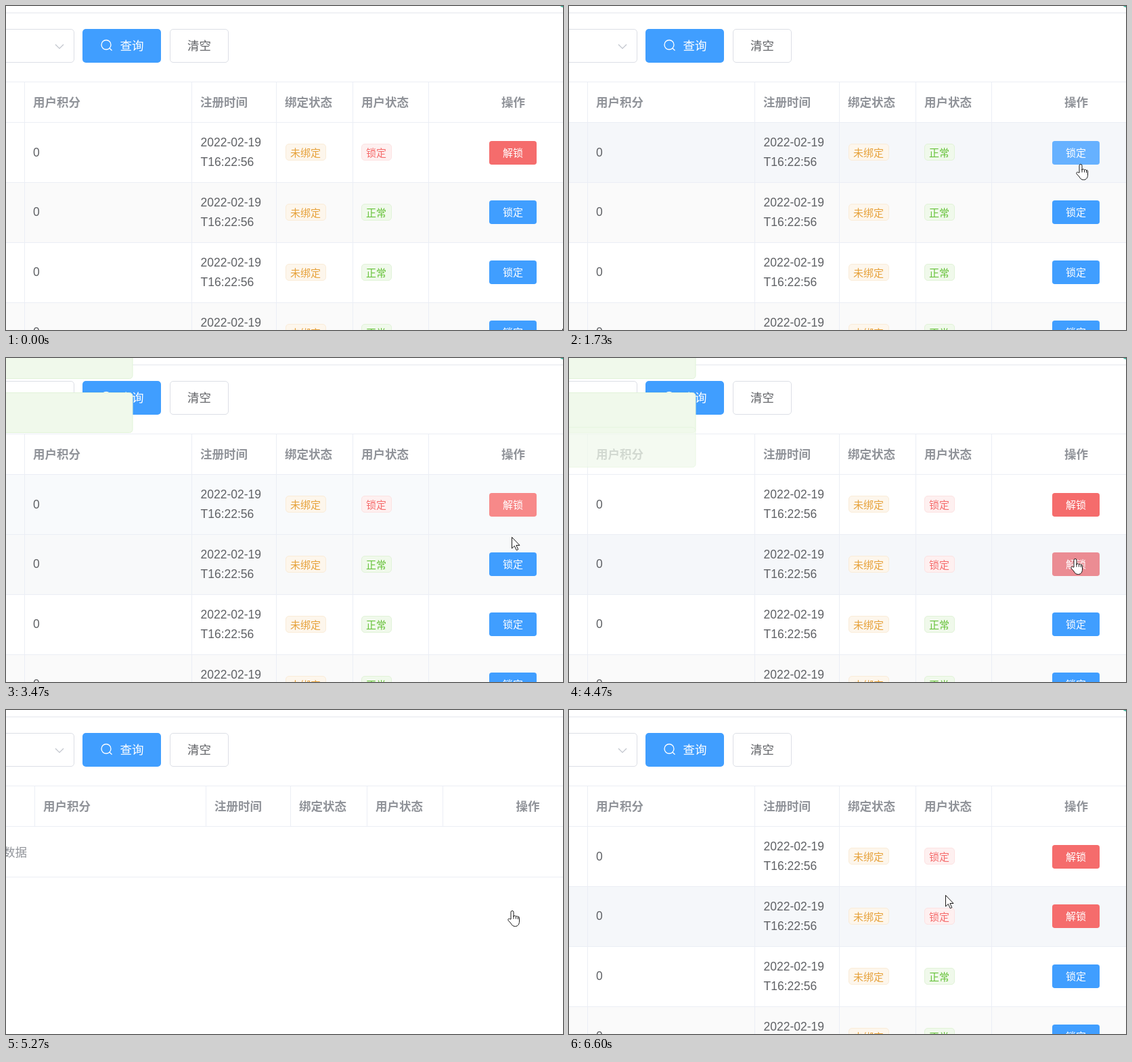
Recreate the animation shown at these times as an HTML page. Size 823 px wide and 480 px high, loop 7790 ms.

```html
<!DOCTYPE html>
<html lang="zh-CN">
<head>
<meta charset="utf-8">
<title>用户管理</title>
<style>
html, body { margin: 0; width: 100%; height: 100%; overflow: hidden; background: #fff; }
svg { display: block; }
text { font: 17.5px "Liberation Sans", "Noto Sans CJK SC", "Noto Sans CJK", sans-serif; fill: #606266; }
.head { font-weight: bold; fill: #909399; }
.small { font-size: 15px; }
</style>
</head>
<body>
<svg id="stage" width="823" height="480" viewBox="0 0 823 480"></svg>
<script>
const LOOP = 7790, STEP = 200 / 3;
const stage = document.getElementById('stage');

// Cursor way points: time, x, y
const PATH = [
  [133, 822, 478], [800, 762, 190], [933, 752, 214], [1133, 756, 234],
  [3333, 756, 234], [3400, 750, 262], [3466, 747, 265], [3667, 748, 302], [3800, 748, 297],
  [5267, 748, 297], [5667, 782, 278], [5867, 782, 278], [6267, 660, 264], [6600, 556, 274]
];
const PRESSES = [1390, 2590, 4060];
const MESSAGES = [1630, 2850, 4345];
const RELOAD = 5260, LOADED = 5390;

const BLUE = { base: '#409eff', hover: '#66b1ff', active: '#3a8ee6' };
const RED = { base: '#f56c6c', hover: '#f78989', active: '#dd6161' };
const TAGS = {
  未绑定: ['#fdf6ec', '#faecd8', '#e6a23c'],
  锁定: ['#fef0f0', '#fde2e2', '#f56c6c'],
  正常: ['#f0f9eb', '#e1f3d8', '#67c23a']
};

const between = (v, a, b) => v >= a && v < b;
const buttonTop = row => 200 + Math.floor(88.75 * row);
const isEmpty = t => between(t, RELOAD, LOADED);

// The CSS "ease" curve
function ease(x) {
  if (x <= 0) return 0;
  if (x >= 1) return 1;
  let lo = 0, hi = 1, s;
  for (let i = 0; i < 20; i++) {
    s = (lo + hi) / 2;
    const bx = .75 * s * (1 - s) * (1 - s) + .75 * s * s * (1 - s) + s ** 3;
    bx < x ? lo = s : hi = s;
  }
  return .3 * s * (1 - s) * (1 - s) + 3 * s * s * (1 - s) + s ** 3;
}

function cursorAt(t) {
  const i = PATH.findIndex(p => p[0] > t);
  if (i < 1) return (i ? PATH[PATH.length - 1] : PATH[0]).slice(1);
  const [t0, x0, y0] = PATH[i - 1], [t1, x1, y1] = PATH[i];
  let k = (t - t0) / (t1 - t0);
  k = k * k * (3 - 2 * k);
  return [x0 + (x1 - x0) * k, y0 + (y1 - y0) * k];
}

const hoveredRow = t => t < 200 || isEmpty(t) ? -1 : Math.floor((cursorAt(t)[1] - 173) / 89);

function hoveredButton(t) {
  const [x, y] = cursorAt(t);
  if (!between(x, 714, 784)) return -1;
  return [0, 1, 2, 3].findIndex(r => between(y, buttonTop(r), buttonTop(r) + 35));
}

const isLocked = (row, t) =>
  row === 0 ? !between(t, 1610, 2850) : row === 1 && t >= 4380;

function rowColor(row, t) {
  if (hoveredRow(t) === row) return '#f5f7fa';
  return row % 2 ? '#fafafa' : '#ffffff';
}

function buttonColor(row, t) {
  const focused = row === 0 ? between(t, 1390, 4060) : row === 1 && between(t, 4060, RELOAD);
  const set = isLocked(row, t) ? RED : BLUE;
  return focused || hoveredButton(t) === row ? set.hover : set.base;
}

// A colour transition: the mean of the colour over the last moments
function fade(color, row, t, duration) {
  const sum = [0, 0, 0], n = 12;
  for (let i = 0; i < n; i++) {
    const c = color(row, t - duration * i / n);
    sum.forEach((_, j) => sum[j] += parseInt(c.substr(1 + 2 * j, 2), 16) / n);
  }
  return `rgb(${sum.map(Math.round)})`;
}

const box = (x, y, w, h, fill, extra = '') =>
  `<rect x="${x}" y="${y}" width="${w}" height="${h}" fill="${fill}" ${extra}/>`;
const framed = (x, y, w, h, fill, stroke, extra = '') =>
  box(x + .5, y + .5, w - 1, h - 1, fill, `rx="4.5" stroke="${stroke}" ${extra}`);
const label = (x, y, s, extra = '') => `<text x="${x}" y="${y}" ${extra}>${s}</text>`;
const line = (x, y, w, h) => box(x, y, w, h, '#ebeef5');

function tag(x, y, name) {
  const [fill, edge, ink] = TAGS[name];
  return framed(x, y, 15 * name.length + 15, 25, fill, edge) +
    label(x + 7, y + 18.5, name, `class="small" style="fill:${ink}"`);
}

function toolbar() {
  return box(0, 9.5, 823, 1.5, '#ebeef2') +
    framed(-20, 34, 121, 50, '#fff', '#dcdfe6') +
    '<path d="M73 57l6 6 6-6" fill="none" stroke="#c0c4cc" stroke-width="1.2"/>' +
    box(113, 34, 116, 50, BLUE.base, 'rx="5"') +
    '<path d="M155 57.5a7 7 0 1 0-14 0a7 7 0 1 0 14 0M153 62.5l3.5 3.5" fill="none" stroke="#fff" stroke-width="1.3"/>' +
    label(168.5, 64.5, '查询', 'style="fill:#fff"') +
    framed(242, 34, 87, 50, '#fff', '#dcdfe6') +
    label(268, 64.5, '清空');
}

function header(cols, actionX) {
  const names = ['用户积分', '注册时间', '绑定状态', '用户状态'];
  return names.map((s, i) => label(cols[i] + 13, 148.5, s, 'class="head"')).join('') +
    label(actionX, 148.5, '操作', 'class="head"') +
    line(0, 112, 823, 1) + line(0, 172, 823, 1);
}

function emptyTable() {
  const cols = [42, 295, 420, 533, 645];
  return header(cols, 753.5) + cols.map(x => line(x, 112, 1, 60)).join('') +
    label(-39, 216.5, '暂无数据', 'style="fill:#909399"') + line(0, 247, 823, 1);
}

function tableRow(row, t) {
  const d = 89 * row, top = buttonTop(row), locked = isLocked(row, t);
  const press = PRESSES.some(p => between(t, p, p + 130)) && hoveredButton(t) === row;
  const fill = press ? (locked ? RED : BLUE).active : fade(buttonColor, row, t, 100);
  return box(0, 173 + d, 823, 88, fade(rowColor, row, t, 250)) +
    line(0, 261 + d, 823, 1) +
    label(40, top + 23, '0') +
    label(287.5, 208 + d, '2022-02-19') + label(287.5, 237 + d, 'T16:22:56') +
    tag(413, 204 + d, '未绑定') + tag(525, 204 + d, locked ? '锁定' : '正常') +
    box(714, top, 70, 35, fill, 'rx="3.75"') +
    label(734, top + 23, locked ? '解锁' : '锁定', 'class="small" style="fill:#fff"');
}

function fullTable(t) {
  const cols = [27, 274, 399, 512, 624];
  return [0, 1, 2, 3].map(row => tableRow(row, t)).join('') + header(cols, 732) +
    cols.map(x => line(x, 112, 1, 368)).join('') +
    '<circle cx="823" cy="-3" r="5" fill="#41b8a0"/>';
}

function messages(t) {
  return MESSAGES.map((start, i) => {
    if (!between(t, start, RELOAD)) return '';
    const y = -29 + 80 * i - 60 * (1 - ease((t - start) / 400));
    return framed(-300, y, 487.5, 60, '#f0f9eb', '#e1f3d8', `opacity="${ease((t - start) / 300)}"`);
  }).join('');
}

function cursor(t) {
  const [x, y] = cursorAt(t).map(Math.round);
  const hand = hoveredButton(t) >= 0 || isEmpty(t);
  const shape = hand
    ? 'M5 13V2.5a2 2 0 0 1 4 0V9c0-2 3.5-1.6 3.5.5c0-1.8 3-1.4 3 .6c0-1.4 2-1.2 2 .8V16c0 4-2 7.5-6 7.5s-5-2-6.5-4.5L1.2 14.8c-1.2-2.2 1-3.6 2.6-2zM9 8v4.5M12.5 9.5v3M15.5 10v3'
    : 'M.5.5V17l3.8-3.6l3 6.4l2.5-1.2l-2.9-6.1h5.1z';
  return `<path d="${shape}" transform="translate(${hand ? x - 7 : x} ${y})" fill="#fff" stroke="#000" stroke-width=".9" stroke-linejoin="round"/>`;
}

let shown = -1;
function play(now) {
  const step = Math.floor((now % LOOP + 5) / STEP);
  if (step !== shown) {
    shown = step;
    const t = step * STEP;
    stage.innerHTML = toolbar() + (isEmpty(t) ? emptyTable() : fullTable(t)) + messages(t) + cursor(t);
  }
  requestAnimationFrame(play);
}
play(0);
</script>
</body>
</html>
```
